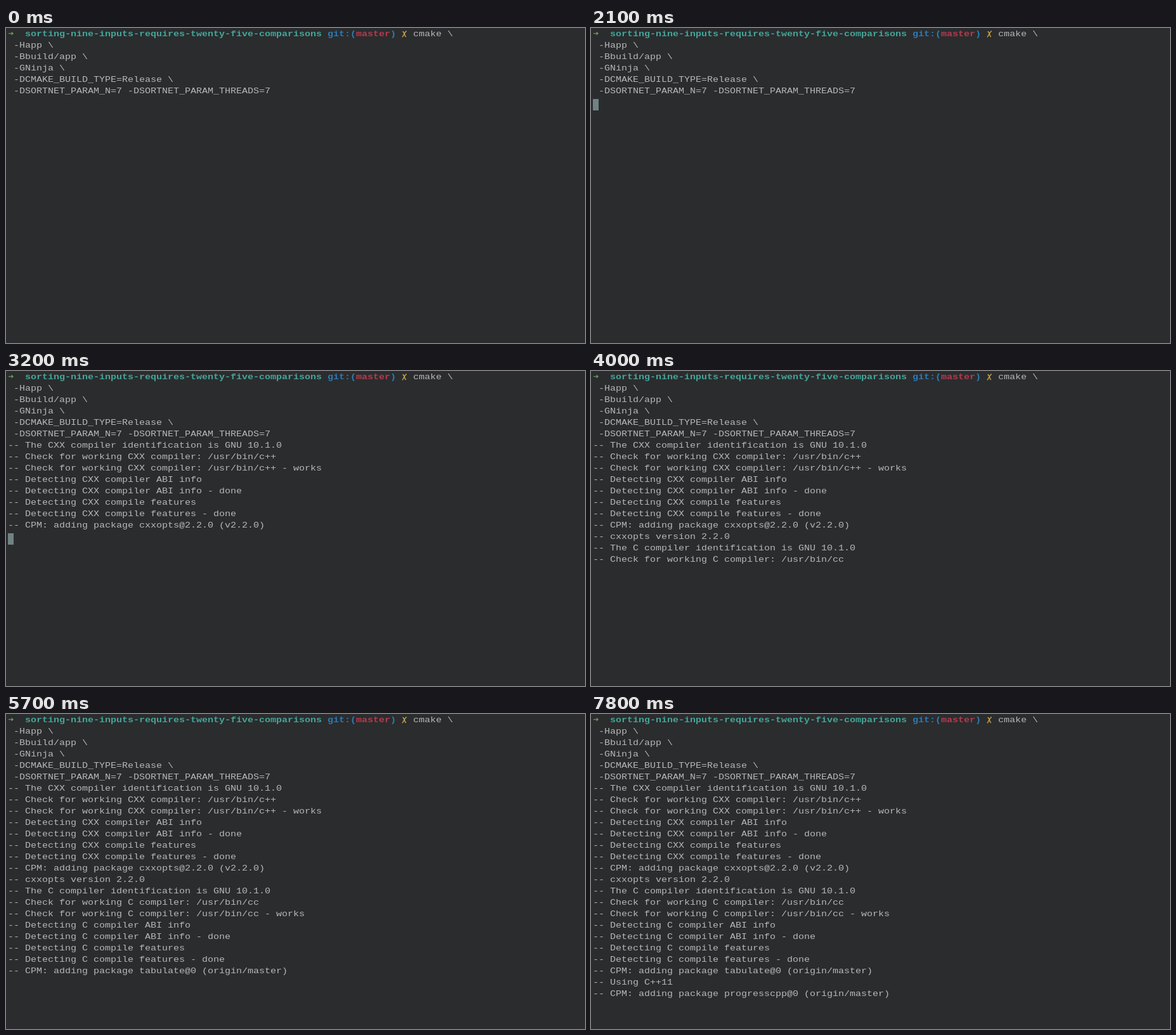
Recreate the animation shown at these times as an HTML page with a canvas. Size 913 by 497 pixels, loop 8 s.

```html
<!DOCTYPE html>
<html lang="en">
<head>
<meta charset="utf-8">
<title>Terminal session</title>
<style>
  html, body { margin: 0; width: 100%; height: 100%; overflow: hidden; background: #2b2c2e; }
  canvas { display: block; }
</style>
</head>
<body>
<canvas id="screen" width="913" height="497"></canvas>
<script>
const LOOP = 8000;
const LEFT = 3, CELL = 9, ROW = 18, BASELINE = 13, CURSOR_TOP = 4;
const FONT = '15px "Liberation Mono", "DejaVu Sans Mono", monospace';
const FLATTEN = 0.86; // low, wide letters in the manner of a typewriter face
const COLORS = { back: '#2b2c2e', text: '#b6b7b7', cursor: '#708284', dirty: '#c2a24c' };
const ctx = document.getElementById('screen').getContext('2d');

// Coloured parts of the prompt: column, text, colour
const prompt = [
  [0, '➜', '#6f9f58'],
  [3, 'sorting-nine-inputs-requires-twenty-five-comparisons', '#43a699'],
  [56, 'git:(', '#2b7cb5'],
  [61, 'master', '#b53a4e'],
  [67, ')', '#2b7cb5'],
];

const command = [
  ' '.repeat(71) + 'cmake \\',
  ' -Happ \\',
  ' -Bbuild/app \\',
  ' -GNinja \\',
  ' -DCMAKE_BUILD_TYPE=Release \\',
  ' -DSORTNET_PARAM_N=7 -DSORTNET_PARAM_THREADS=7',
];

const checks = (lang, path) => [
  `The ${lang} compiler identification is GNU 10.1.0`,
  `Check for working ${lang} compiler: ${path}`,
  `Check for working ${lang} compiler: ${path} - works`,
  `Detecting ${lang} compiler ABI info`,
  `Detecting ${lang} compiler ABI info - done`,
  `Detecting ${lang} compile features`,
  `Detecting ${lang} compile features - done`,
];

const output = [
  ...checks('CXX', '/usr/bin/c++'),
  'CPM: adding package cxxopts@2.2.0 (v2.2.0)',
  'cxxopts version 2.2.0',
  ...checks('C', '/usr/bin/cc'),
  'CPM: adding package tabulate@0 (origin/master)',
  'Using C++11',
  'CPM: adding package progresscpp@0 (origin/master)',
].map(line => '-- ' + line);

// Start time and number of output lines printed by then
const progress = [[0, 0], [2200, 4], [2300, 8], [4000, 11], [4100, 13], [4200, 17], [7800, 19]];

function cursorOn(t) {
  if (t < 2100) return Math.floor(t / 500) % 2 === 1;
  return t < 2200 || Math.floor((t - 2200) / 500) % 2 === 0;
}

function put(text, col, row, color, weight = '') {
  ctx.save();
  ctx.translate(LEFT + col * CELL, BASELINE + row * ROW);
  ctx.scale(1, FLATTEN);
  ctx.font = `${weight} ${FONT}`;
  ctx.fillStyle = color;
  ctx.fillText(text, 0, 0);
  ctx.restore();
}

// The slanted cross that marks a dirty working tree
function drawCross(col) {
  const x = LEFT + col * CELL;
  ctx.strokeStyle = COLORS.dirty;
  ctx.lineWidth = 1.5;
  ctx.beginPath();
  ctx.moveTo(x + 7.5, 4.5);
  ctx.quadraticCurveTo(x + 4, 8, x + 1, 14.5);
  ctx.moveTo(x + 1.5, 5.5);
  ctx.quadraticCurveTo(x + 3.5, 6, x + 4.5, 10);
  ctx.quadraticCurveTo(x + 5, 13.5, x + 7, 13.5);
  ctx.stroke();
}

function draw(t) {
  ctx.fillStyle = COLORS.back;
  ctx.fillRect(0, 0, 913, 497);

  const count = progress.filter(([start]) => start <= t).pop()[1];
  const lines = [...command, ...output.slice(0, count)];

  if (cursorOn(t)) {
    const [col, row] = t < 2100 ? [78, 0] : [0, lines.length];
    ctx.fillStyle = COLORS.cursor;
    ctx.fillRect(LEFT + col * CELL, CURSOR_TOP + row * ROW, CELL, ROW);
  }

  prompt.forEach(([col, text, color]) => put(text, col, 0, color, 'bold'));
  drawCross(69);
  lines.forEach((line, row) => {
    const col = line.search(/\S/);
    put(line.slice(col), col, row, COLORS.text);
  });
}

const begin = performance.now();
function tick() {
  draw((performance.now() - begin) % LOOP);
  requestAnimationFrame(tick);
}
tick();
</script>
</body>
</html>
```
